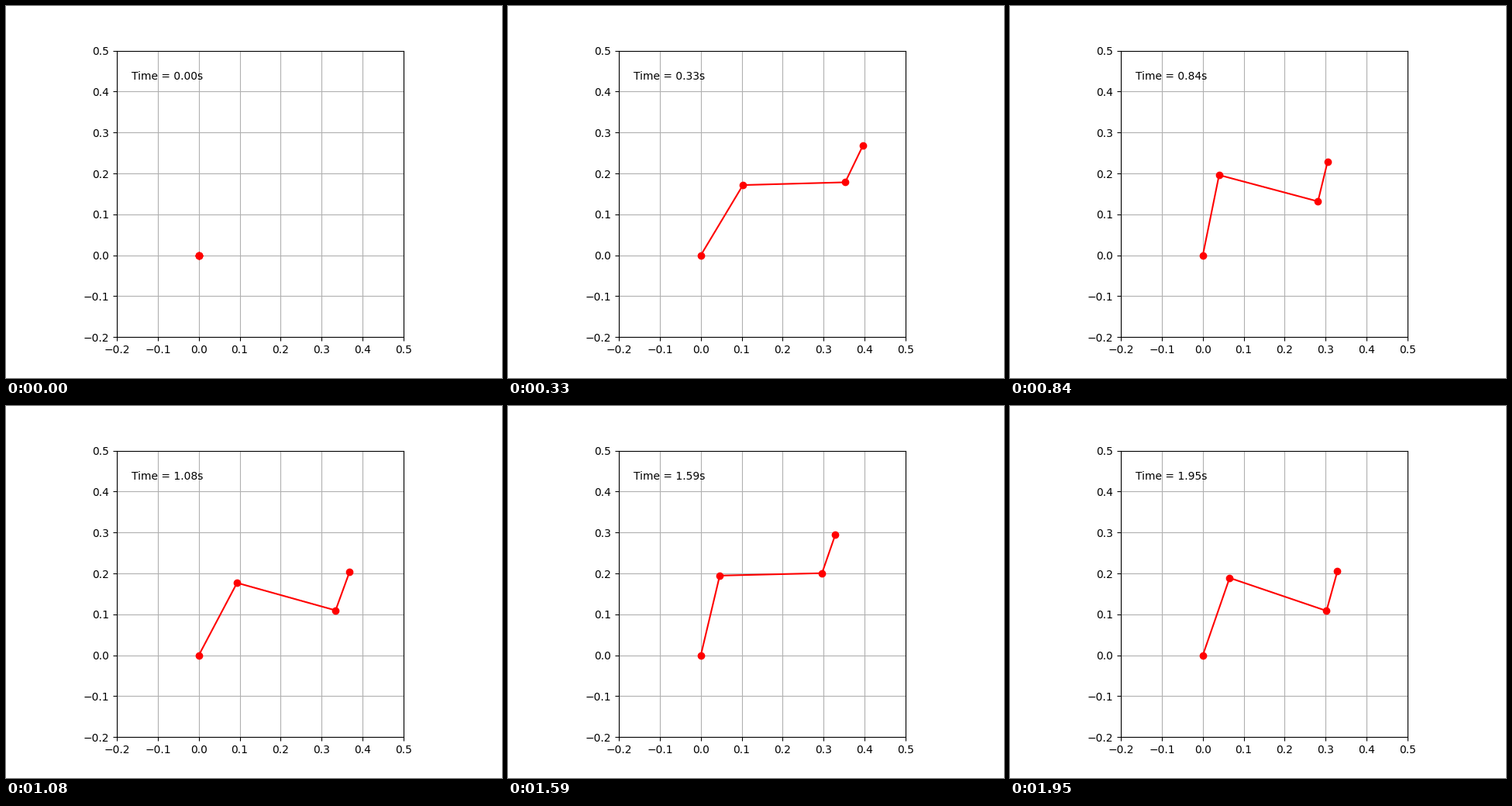
These frames come from a looping animation (640 by 480 pixels, 1.98 s). A matplotlib script:

```python
import numpy as np
import matplotlib.pyplot as plt
from matplotlib.animation import FuncAnimation

FRAMES, DT = 66, 0.03
L1, L2, L3 = 0.20, 0.25, 0.10
CENTER, RADIUS = np.array([0.35, 0.25]), 0.0498
LAG = np.radians(7.2)


def polar(length, angle):
    return length * np.array([np.cos(angle), np.sin(angle)])


def arm_joints(t):
    """Joint positions of the arm while its tip runs round a circle."""
    if t == 0:
        return np.zeros((4, 2))
    phase = 2 * np.pi * t - np.pi / 2 - LAG
    tip = CENTER + polar(RADIUS, phase)
    tilt = np.radians(70.3 - 5.75 * np.cos(phase) - 2.0 * np.sin(phase))
    wrist = tip - polar(L3, tilt)
    reach = np.hypot(*wrist)
    bend = np.arccos((L1**2 + reach**2 - L2**2) / (2 * L1 * reach))
    elbow = polar(L1, np.arctan2(wrist[1], wrist[0]) + bend)
    return np.array([[0, 0], elbow, wrist, tip])


fig = plt.figure(figsize=(6.4, 4.8), dpi=100)
ax = fig.add_subplot(111, aspect="equal", xlim=(-0.2, 0.5), ylim=(-0.2, 0.5))
ax.grid()
line, = ax.plot([], [], "ro-")
label = ax.text(0.05, 0.9, "", transform=ax.transAxes)


def update(i):
    t = i * DT
    line.set_data(*arm_joints(t).T)
    label.set_text(f"Time = {t:.2f}s")
    return line, label


anim = FuncAnimation(fig, update, frames=FRAMES, interval=30,
                     repeat=True, repeat_delay=0)
plt.show()
```
